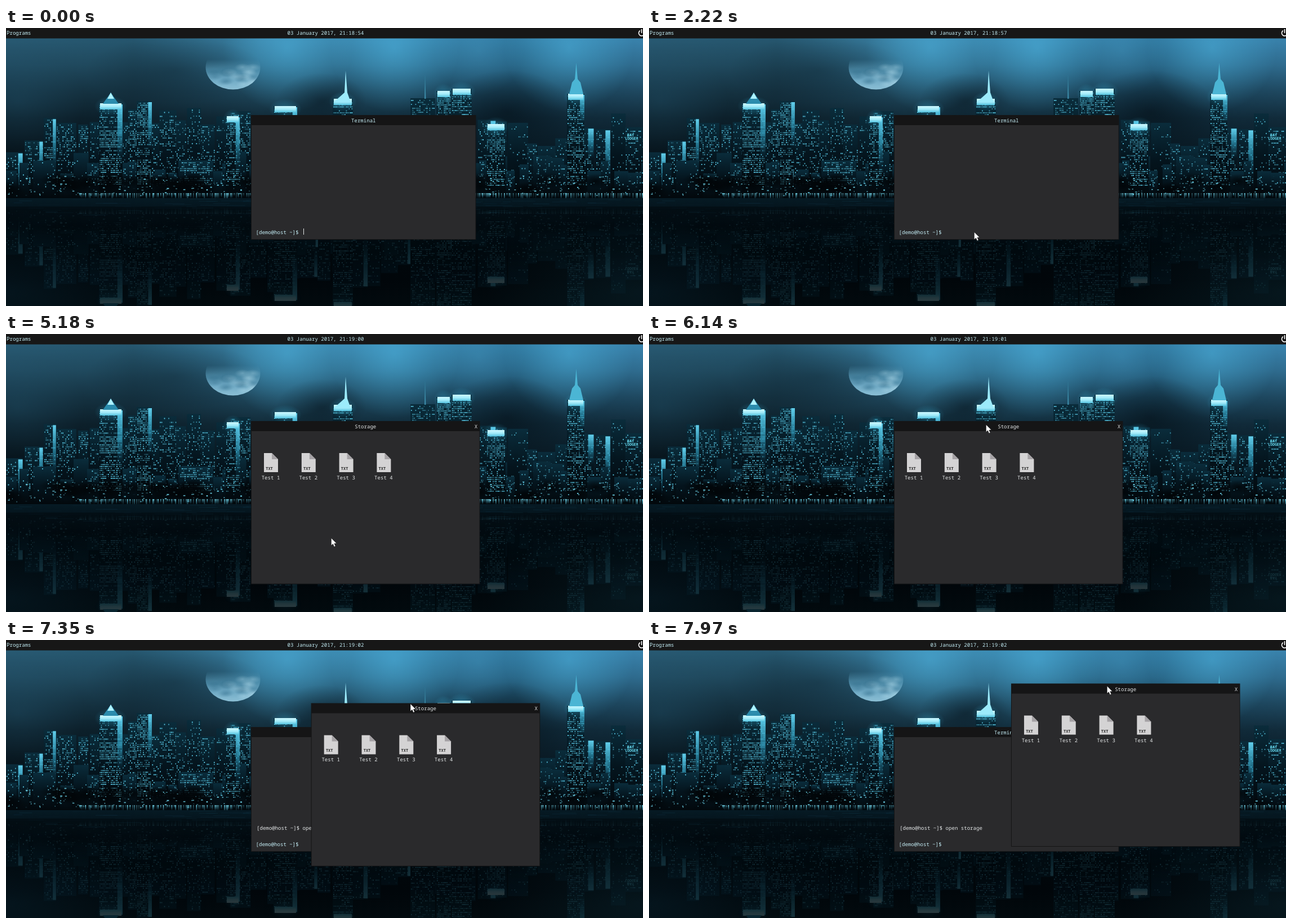
Write an HTML page with a canvas that moves like this. It is 1131 px wide and 495 px high and loops after 7990 ms.

```html
<!DOCTYPE html>
<html lang="en">
<head>
<meta charset="utf-8">
<title>Desktop</title>
<style>
  html, body { margin: 0; width: 100%; height: 100%; overflow: hidden; background: #02080c; }
  canvas { display: block; }
</style>
</head>
<body>
<canvas id="stage" width="1131" height="495"></canvas>
<script>
const W = 1131, H = 495, LOOP = 7990, SHORE = 303;
const CYAN = '#c4edf5', PALE = '#e2e5e6', ADVANCE = 5.44;
const MONO = '"Noto Sans Mono", "DejaVu Sans Mono", monospace';
const PROMPT = '[demo@host ~]$', COMMAND = 'open storage';
const BLUR = 2020, FOCUS = 3190, ENTER = 4750, OPEN = 4850;
const DRAG_START = 7060, DRAG_LAG = 25;

const MOVES = [
  { from: 280, to: 350, x: 714, y: 385 },
  { from: 630, to: 850, x: 593, y: 342 },
  { from: 1590, to: 2020, x: 577, y: 363 },
  { from: 5390, to: 5780, x: 603, y: 148 },
  { from: 5960, to: 6140, x: 598, y: 161 },
  { from: DRAG_START, to: 7500, x: 761, y: 96 },
  { from: 7730, to: 8100, x: 833, y: 76 },
];

let seed = 7;
const rand = (min = 0, max = 1) => min + (max - min) * (seed = (seed * 16807) % 2147483647) / 2147483647;
const clamp = (v, min, max) => Math.min(max, Math.max(min, v));
const bell = (x, center, width) => Math.exp(-(((x - center) / width) ** 2));

function pointerAt(t) {
  let x = 907, y = 459;
  for (const m of MOVES) {
    const p = clamp((t - m.from) / (m.to - m.from), 0, 1), eased = p * p * (3 - 2 * p);
    x += (m.x - x) * eased;
    y += (m.y - y) * eased;
  }
  return { x, y };
}

function storageAt(t) {
  const grab = pointerAt(DRAG_START), now = pointerAt(Math.max(DRAG_START, t - DRAG_LAG));
  return { x: 435 + now.x - grab.x, y: 155 + now.y - grab.y };
}

// Two bursts of typing: six slow keys, then six quick ones.
function typedAt(t) {
  const burst = (start, step) => clamp(Math.floor((t - start) / step) + 1, 0, 6);
  return burst(3240, 138) + burst(4160, 78);
}

function clockAt(t) {
  const second = t < 1590 ? 54 : 57 + Math.floor((t - 2220) / 975);
  return `21:${18 + Math.floor(second / 60)}:${String(second % 60).padStart(2, '0')}`;
}

function newCanvas() {
  const c = document.createElement('canvas');
  c.width = W;
  c.height = H;
  return [c, c.getContext('2d')];
}

function rect(g, x, y, w, h, color) {
  g.fillStyle = color;
  g.fillRect(x, y, w, h);
}

function poly(g, points, color) {
  g.beginPath();
  points.forEach(([x, y]) => g.lineTo(x, y));
  g.closePath();
  g.fillStyle = color;
  g.fill();
}

function text(g, s, x, y, color = PALE, align = 'left', size = 9.07, weight = 400) {
  g.font = `${weight} ${size}px ${MONO}`;
  g.textAlign = align;
  g.fillStyle = color;
  g.fillText(s, x, y);
}

// Evenly spaced colours from one end of the rectangle to the other.
function fade(g, x, y, w, h, colors, sideways = false) {
  const fill = sideways ? g.createLinearGradient(x, 0, x + w, 0) : g.createLinearGradient(0, y, 0, y + h);
  colors.forEach((color, i) => fill.addColorStop(i / (colors.length - 1), color));
  rect(g, x, y, w, h, fill);
}

function glow(g, x, y, rx, ry, rgb, alpha) {
  g.save();
  g.translate(x, y);
  g.scale(rx, ry);
  const fill = g.createRadialGradient(0, 0, 0, 0, 0, 1);
  fill.addColorStop(0, `rgba(${rgb},${alpha})`);
  fill.addColorStop(1, `rgba(${rgb},0)`);
  rect(g, -1, -1, 2, 2, fill);
  g.restore();
}

function paintSky(g) {
  fade(g, 0, 0, W, SHORE, ['#285a73', '#26576f', '#3a82a6', '#3987af', '#2f779e', '#3a84ae'], true);
  const haze = a => `rgba(3,12,18,${a})`;
  fade(g, 0, 18, W, SHORE - 18, [0, .2, .5, .74, .86, .93, .97].map(haze));
  for (const x of [500, 690, 1000]) glow(g, x, 35, 115, 115, '80,185,230', .5);
  glow(g, 840, 40, 80, 80, '80,170,215', .25);
  glow(g, 560, 130, 80, 50, '2,10,16', .4);
  glow(g, 890, 150, 120, 75, '2,10,16', .5);
  glow(g, 300, 75, 160, 60, '2,10,16', .25);
  glow(g, 20, 130, 120, 90, '40,100,130', .25);
}

function paintMoon(g) {
  g.save();
  g.beginPath();
  g.ellipse(403, 70, 48.5, 39.5, 0, 0, 7);
  g.clip();
  fade(g, 350, 56, 110, 54, ['rgba(80,145,175,0)', 'rgba(85,150,180,.7)', '#6fa9c4', '#8cc0d6']);
  for (let i = 0; i < 26; i++)
    glow(g, rand(360, 446), rand(68, 105), 14, 7, i % 2 ? '45,105,135' : '195,232,245', .3);
  g.restore();
}

function tower(g, x, w, top, lit) {
  fade(g, x, top, w, SHORE - top, ['#0a2c3b', '#04141d', '#02080c']);
  for (let wy = top + 3; wy < 280; wy += 3.5) {
    const density = lit * rand(.2, 1.8);
    for (let wx = x + 1; wx < x + w - 1; wx += 2.5)
      if (rand() < density) rect(g, wx, wy, 1.8, 2, `rgba(95,212,242,${rand(.25, 1)})`);
  }
  if (rand() < lit) {
    const side = w * rand(.15, .35);
    fade(g, x + w - side, top + 2, side, rand(50, 110), ['#62cfec', 'rgba(50,165,200,.6)', 'rgba(20,90,120,0)']);
  }
}

function brightRoof(g, x, w, top) {
  glow(g, x + w / 2, top + 5, w * .7, 18, '60,190,230', .35);
  fade(g, x + 2, top, w - 4, 11, ['#cdf8ff', '#a5ecfa', '#57c4e0']);
}

// Heights dip at the left edge and right of centre.
function paintBlocks(g) {
  for (let x = 0; x < W;) {
    const w = rand(17, 36);
    const dip = 55 * bell(x, 20, 40) + 45 * bell(x, 940, 65) + 25 * bell(x, 640, 180);
    tower(g, x, w, rand(135, 182) + dip, x > 60 && x < 430 ? rand(.15, .5) : rand(.08, .38));
    x += w + rand(-3, 4);
  }
  for (let x = 0; x < W; x += 24) tower(g, x, rand(12, 32), rand(220, 262), rand(.04, .25));
}

function paintLandmarks(g) {
  const crowned = [[165, 42, 134], [390, 25, 157], [475, 42, 139], [580, 36, 126], [764, 26, 112],
    [791, 36, 108], [853, 34, 171], [996, 31, 117]];
  for (const [x, w, top] of crowned) {
    tower(g, x, w, top, .55);
    brightRoof(g, x, w, top);
  }
  tower(g, 232, 27, 130, .6);
  tower(g, 718, 44, 125, .35);
  tower(g, 306, 62, 236, .5);
  poly(g, [[172, 135], [186, 115], [200, 135]], '#2b8cad');
  poly(g, [[180, 126], [186, 115], [192, 126]], '#aef2ff');
  poly(g, [[582, 132], [601, 115], [603, 76], [606, 115], [612, 132]], '#9cebfb');
  poly(g, [[743, 126], [744, 82], [745.5, 126]], '#3b8aa7');
  poly(g, [[1000, 118], [1005, 97], [1010, 91], [1012.5, 62], [1015, 91], [1020, 97], [1025, 118]], '#4bb5d4');
  text(g, 'BAY', 1109, 193, '#66d9ef', 'center', 7, 700);
  text(g, 'LODGER', 1111, 199, '#66d9ef', 'center', 6.4, 700);
}

function paintWaterfront(g) {
  for (let i = 0; i < 70; i++) glow(g, rand(0, W), rand(270, 292), 28, 13, '1,5,8', .85);
  for (let i = 0; i < 420; i++) {
    const x = rand(0, W), y = rand(262, 298);
    rect(g, x, y, rand(1, 4), rand(1, 2.2), `rgba(115,222,245,${rand()})`);
  }
  for (let x = 130; x < W; x += rand(1.5, 6))
    fade(g, x, 294, 2, rand(5, 14), [`rgba(130,230,250,${rand(.2, 1)})`, 'rgba(60,180,215,0)']);
}

function paintWater(g, city) {
  fade(g, 0, SHORE, W, H - SHORE, ['#061a24', '#020b11', '#01070b', '#01060a', '#020a0e']);
  g.save();
  g.beginPath();
  g.rect(0, 318, W, H);
  g.clip();
  g.globalAlpha = .2;
  g.filter = 'blur(.6px)';
  g.translate(0, 625);
  g.scale(1, -1);
  g.drawImage(city, 0, 0);
  g.restore();
  fade(g, 0, 318, W, 60, ['rgba(2,10,15,.6)', 'rgba(2,10,15,0)']);
  for (let i = 0; i < 150; i++)
    rect(g, rand(0, W), rand(304, 334), rand(10, 50), 1, `rgba(35,105,135,${rand(0, .16)})`);
  glow(g, 0, 470, 260, 110, '12,50,68', .3);
  glow(g, W, 470, 280, 120, '15,50,62', .35);
}

function paintTopBar(g) {
  rect(g, 0, 0, W, 18.5, '#171717');
  text(g, 'Programs', 1, 12, CYAN);
  g.strokeStyle = '#fff';
  g.lineWidth = 1.6;
  g.beginPath();
  g.arc(1128.5, 9, 5, -1, 4.14);
  g.moveTo(1128.5, 2);
  g.lineTo(1128.5, 9);
  g.stroke();
}

function paintDesktop() {
  const [desk, g] = newCanvas(), [city, c] = newCanvas();
  paintSky(g);
  paintMoon(g);
  paintBlocks(c);
  paintLandmarks(c);
  paintWaterfront(c);
  g.drawImage(city, 0, 0);
  paintWater(g, city);
  paintTopBar(g);
  return desk;
}

function frameWindow(g, x, y, w, h, title, color) {
  rect(g, x, y, w, h, '#151516');
  rect(g, x + 1, y + 18, w - 2, h - 19, '#2a2a2c');
  text(g, title, x + w / 2, y + 13, color, 'center');
}

function drawTerminal(g, t) {
  frameWindow(g, 435, 155, 399.5, 222, 'Terminal', CYAN);
  text(g, PROMPT, 443.5, 367, CYAN);
  const entered = t >= ENTER, typed = entered ? 0 : typedAt(t);
  if (entered) text(g, `${PROMPT} ${COMMAND}`, 445, 338);
  text(g, COMMAND.slice(0, typed), 528, 367);
  const focused = t < BLUR || (t >= FOCUS && t < OPEN);
  if (focused) rect(g, Math.round(528 + typed * ADVANCE), 357, 1, 11, PALE);
}

function drawStorage(g, t) {
  const { x, y } = storageAt(t);
  frameWindow(g, x, y, 406.5, 290.5, 'Storage', PALE);
  text(g, 'X', x + 399.5, y + 13, PALE, 'center');
  for (let i = 0; i < 4; i++) {
    const ix = x + 23 + i * 66.8, iy = y + 57;
    poly(g, [[ix, iy], [ix + 14, iy], [ix + 25, iy + 11], [ix + 25, iy + 34], [ix, iy + 34]], '#d4d3d4');
    poly(g, [[ix + 14, iy], [ix + 25, iy + 11], [ix + 14, iy + 11]], '#a5a2a5');
    text(g, 'TXT', ix + 9.5, iy + 30, '#222', 'center', 7, 600);
    text(g, `Test ${i + 1}`, ix + 12, y + 104, PALE, 'center');
  }
}

function drawPointer(g, t) {
  const { x, y } = pointerAt(t);
  const shape = [[0, 0], [0, 13], [3, 10.3], [5.2, 15.3], [7.4, 14.3], [5.3, 9.5], [9.3, 9.3]];
  poly(g, shape.map(([dx, dy]) => [x + dx + .5, y + dy + .5]), '#fff');
  g.strokeStyle = 'rgba(0,0,0,.6)';
  g.lineWidth = .6;
  g.stroke();
}

const screen = document.getElementById('stage').getContext('2d');
screen.textRendering = 'geometricPrecision';
const desktop = paintDesktop();

function draw() {
  const t = performance.now() % LOOP;
  screen.drawImage(desktop, 0, 0);
  text(screen, `03 January 2017, ${clockAt(t)}`, 499.5, 12, CYAN);
  drawTerminal(screen, t);
  if (t >= OPEN) drawStorage(screen, t);
  if (t >= MOVES[0].from) drawPointer(screen, t);
  requestAnimationFrame(draw);
}
draw();
</script>
</body>
</html>
```
